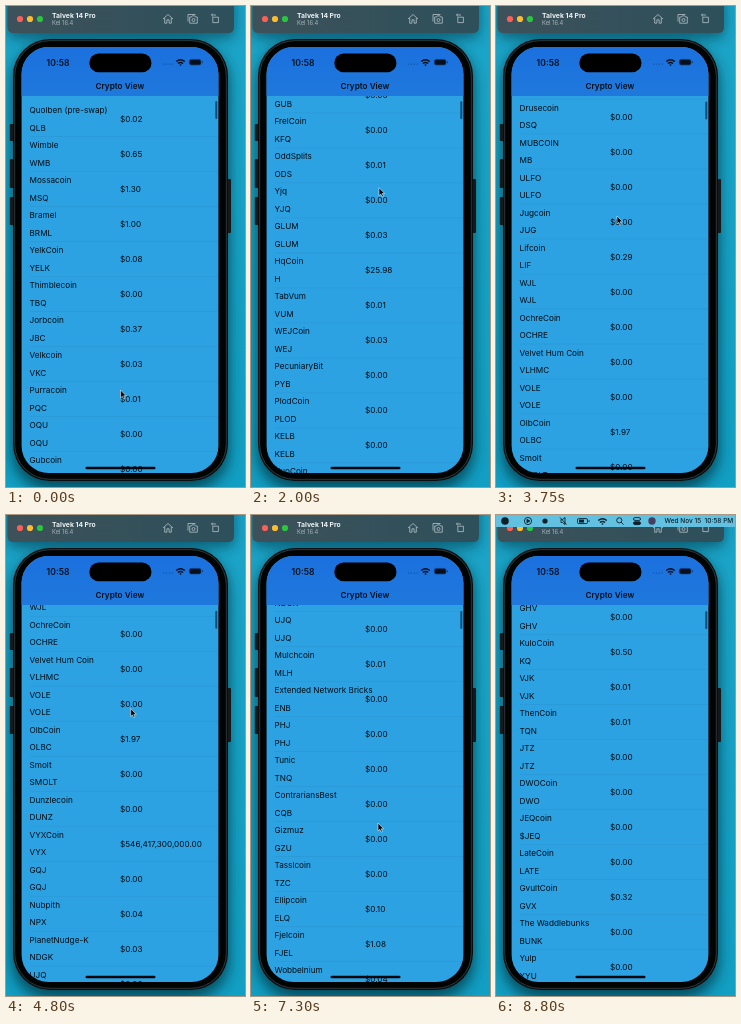
An HTML page for the animation above (8.85 s loop, 239 px wide and 481 px high).

```html
<!DOCTYPE html>
<html lang="en">
<head>
<meta charset="utf-8">
<title>Crypto View</title>
<style>
html, body { margin: 0; width: 100%; height: 100%; overflow: hidden; background: #159fc2; }
svg { display: block; width: 239px; height: 481px; font-family: Inter, Roboto, sans-serif; }
.row { font-size: 8.2px; fill: #020a12; }
.icon { fill: none; stroke: #b4c1c7; stroke-width: .8; }
.menu { fill: none; stroke: #0c2029; stroke-width: .9; }
</style>
</head>
<body>
<svg viewBox="0 0 239 481">
  <defs>
    <linearGradient id="desk" x2="0" y2="1">
      <stop stop-color="#1ba5c8"/><stop offset="1" stop-color="#119fc3"/>
    </linearGradient>
    <linearGradient id="tool">
      <stop stop-color="#3d5159"/><stop offset="1" stop-color="#2d505b"/>
    </linearGradient>
    <linearGradient id="head" x2="0" y2="1">
      <stop stop-color="#1b70de"/><stop offset="1" stop-color="#1f79dc"/>
    </linearGradient>
    <filter id="blur" x="-20%" y="-100%" width="140%" height="300%"><feGaussianBlur stdDeviation="7"/></filter>
    <clipPath id="screen"><rect x="15.6" y="41" width="196.8" height="426" rx="27"/></clipPath>
    <clipPath id="view"><rect x="15" y="90" width="198" height="378"/></clipPath>
    <g id="wifi" fill="none" stroke-width="1.4">
      <path d="M-4.3-1.2Q0-5 4.3-1.2M-2.6.8Q0-1.6 2.6.8"/><path d="M-.8 2.2h1.6"/>
    </g>
  </defs>

  <rect width="239" height="481" fill="url(#desk)"/>
  <g fill="#02303d" filter="url(#blur)">
    <rect x="2" y="-10" width="226" height="42" rx="6" opacity=".6"/>
    <rect x="6" y="38" width="217" height="446" rx="38" opacity=".75"/>
  </g>

  <!-- simulator toolbar -->
  <path d="M1.5 0H228V21Q228 27 222 27H7.5Q1.5 27 1.5 21Z" fill="url(#tool)"/>
  <circle cx="14" cy="13" r="3.1" fill="#fb5f57"/>
  <circle cx="24" cy="13" r="3.1" fill="#fcbc2f"/>
  <circle cx="34" cy="13" r="3.1" fill="#2ac640"/>
  <text x="46" y="12" font-size="6.8" font-weight="700" fill="#eef3f5">Talvek 14 Pro</text>
  <text x="46" y="19" font-size="5.8" fill="#a3b2b9">Kel 16.4</text>
  <g class="icon">
    <path d="M157 13l5-4.5 5 4.5M158.7 12v5.2h2.2v-3.4h2.2v3.4h2.2V12"/>
    <path d="M182 15.5v-7h7.5M183.7 11h1.8l.8-1.2h2.4l.8 1.2h1.8v6.2h-7.6z"/><circle cx="187.5" cy="14" r="1.5"/>
    <path d="M206.8 11.2h5.6v5.4h-5.6zM205.4 9h4.6M206.8 7.6L205.4 9l1.4 1.4"/>
  </g>

  <!-- phone -->
  <g fill="#14191c">
    <rect x="3.8" y="118" width="5" height="17" rx="1"/>
    <rect x="3.8" y="153" width="5" height="29" rx="1"/>
    <rect x="3.8" y="191" width="5" height="28" rx="1"/>
    <rect x="220" y="173" width="5" height="54" rx="1"/>
  </g>
  <rect x="7" y="33" width="215" height="442" rx="37" fill="#0b0e10"/>
  <rect x="8.7" y="34.7" width="211.6" height="438.6" rx="35.3" fill="#020303" stroke="#353a3c" stroke-width=".9"/>
  <g clip-path="url(#screen)">
    <rect x="15" y="41" width="198" height="427" fill="#2da2e3"/>
    <g clip-path="url(#view)"><g id="list"></g></g>
    <rect x="15" y="41" width="198" height="49" fill="url(#head)"/>
    <rect id="thumb" x="209.3" y="95" width="2" height="18" rx="1" fill="#124c78"/>
    <rect x="79.5" y="460.8" width="70" height="2.5" rx="1.25" fill="#02060a"/>
  </g>
  <text x="52" y="59.8" font-size="8.6" font-weight="600" text-anchor="middle" fill="#06101c">10:58</text>
  <rect x="83.3" y="47.6" width="62.2" height="18.6" rx="9.3"/>
  <path d="M157 58.2h10" stroke="#1558ad" stroke-width="1.3" stroke-dasharray="1.3 1.6"/>
  <use href="#wifi" x="174.5" y="56.8" stroke="#06101c"/>
  <rect x="183.4" y="53.4" width="11.6" height="5.6" rx="1.8" fill="#06101c" stroke="#123f80" stroke-width=".7"/>
  <path d="M196.4 55.2v2" stroke="#123f80"/>
  <text x="113.9" y="82.5" font-size="8.2" font-weight="600" text-anchor="middle" fill="#06101c">Crypto View</text>

  <path id="mouse" d="M0 0V8L1.8 6.3 3.1 9.1 4.4 8.5 3.2 5.8H5.7Z" fill="#050505" stroke="#e8f2f8" stroke-width=".6"/>

  <!-- system menu bar -->
  <g id="bar">
    <rect width="239" height="12" fill="#62c1e1"/>
    <circle cx="9" cy="6" r="3.8" fill="#0c2029"/>
    <g class="menu">
      <circle cx="32" cy="6" r="3.6"/><path d="M31 4.3v3.4L33.8 6z" fill="#0c2029"/>
      <path d="M65 4.5h1.5L69 2.5v7L66.5 7.5H65zM64 2.5l6.5 7"/>
      <rect x="81.5" y="3.6" width="10" height="5" rx="1.3"/><path d="M83 6.1h5" stroke-width="3"/><path d="M93 5.2v1.8"/>
      <circle cx="123.3" cy="5.3" r="2.6"/><path d="M125.2 7.2l2.3 2.4"/>
      <rect x="137.5" y="2.6" width="7" height="2.8" rx="1.4"/><rect x="137.5" y="6.8" width="7" height="2.8" rx="1.4" fill="#0c2029"/>
    </g>
    <circle cx="49" cy="6" r="2.6" fill="#0c2029"/>
    <use href="#wifi" x="106.5" y="6.8" stroke="#0c2029"/>
    <circle cx="156" cy="6" r="3.7" fill="#45405f"/>
    <text x="168.5" y="8.3" font-size="6.5" font-weight="500" fill="#0c2029" xml:space="preserve">Wed Nov 15  10:58 PM</text>
  </g>
</svg>
<script>
// name | ticker (defaults to the name) | price (defaults to 0.00)
const coins = `Quolben (pre-swap)|QLB|0.02
Wimble|WMB|0.65
Mossacoin|MSQ|1.30
Bramel|BRML|1.00
YelkCoin|YELK|0.08
Thimblecoin|TBQ
Jorbcoin|JBC|0.37
Velkcoin|VKC|0.03
Purracoin|PQC|0.01
OQU
Gubcoin|GUB
FrelCoin|KFQ
OddSplits|ODS|0.01
Yjq|YJQ
GLUM||0.03
HqCoin|H|25.98
TabVum|VUM|0.01
WEJCoin|WEJ|0.03
PecuniaryBit|PYB
PlodCoin|PLOD
KELB
VuoCoin|VUO|0.01
NubHaul|NUBHL
TovCoin|TOV
Drusecoin|DSQ
MUBCOIN|MB
ULFO
Jugcoin|JUG
Lifcoin|LIF|0.29
WJL
OchreCoin|OCHRE
Velvet Hum Coin|VLHMC
VOLE
OlbCoin|OLBC|1.97
Smolt|SMOLT
Dunzlecoin|DUNZ
VYXCoin|VYX|546,417,300,000.00
GQJ
Nubpith|NPX|0.04
PlanetNudge-K|NDGK|0.03
UJQ
Mulchcoin|MLH|0.01
Extended Network Bricks|ENB
PHJ
Tunic|TNQ
ContrariansBest|CQB
Gizmuz|GZU
Tasslcoin|TZC
Ellipcoin|ELQ|0.10
Fjelcoin|FJEL|1.08
Wobbelnium|WBN|0.04
Hurmcoin|HRQ
Plinkel|PLQ|0.02
GHV
KuloCoin|KQ|0.50
VJK||0.01
ThenCoin|TQN|0.01
JTZ
DWOCoin|DWO
JEQcoin|$JEQ
LateCoin|LATE
GvultCoin|GVX|0.32
The Waddlebunks|BUNK
Yulp|XYU`.split('\n');

const LOOP = 8850, STEP = 50, PITCH = 35;
const get = id => document.getElementById(id);
const list = get('list'), mouse = get('mouse'), thumb = get('thumb'), bar = get('bar');

list.innerHTML = coins.map((line, i) => {
  const [name, ticker, price] = line.split('|');
  return `<g class="row" transform="translate(0 ${i * PITCH})">
    <text x="23.5" y="107">${name}</text>
    <text x="23.5" y="124.6">${ticker || name}</text>
    <text x="114" y="116">$${price || '0.00'}</text>
    <path d="M24 130.5H212" stroke="#2790cc" stroke-width=".5"/></g>`;
}).join('');

// time, scroll offset, pointer x, pointer y
const keys = [
  [0, 0, 114.5, 384],
  [1350, 205, 125.7, 268.5],
  [2650, 560, 128, 119.5],
  [3750, 842.5, 121, 210],
  [5850, 1220, 129, 181.5],
  [7300, 1399, 127, 308],
  [8000, 1660, 250, -12],
  [8800, 1866, 250, -12]
];

// Smooth curve through the keys
function sample(t, col) {
  const last = keys.length - 1;
  const slope = i => {
    const a = keys[Math.max(i - 1, 0)], b = keys[Math.min(i + 1, last)];
    return (b[col] - a[col]) / (b[0] - a[0]);
  };
  let i = 0;
  while (i < last - 1 && t >= keys[i + 1][0]) i++;
  const a = keys[i], b = keys[i + 1], d = b[0] - a[0], u = (t - a[0]) / d, v = 1 - u;
  return v * v * ((1 + 2 * u) * a[col] + u * d * slope(i))
       + u * u * ((3 - 2 * u) * b[col] - v * d * slope(i + 1));
}

const move = (el, x, y) => el.setAttribute('transform', `translate(${x} ${y})`);

function draw(now) {
  const t = Math.floor(now % LOOP / STEP) * STEP;
  const scroll = sample(t, 1);
  move(list, 0, -scroll);
  move(thumb, 0, scroll / 1400);
  move(mouse, sample(t, 2), sample(t, 3));
  const shown = Math.min(1, Math.max(0, (t - 7900) / 200));
  move(bar, 0, -13 * (1 - shown) ** 2);
}

const start = performance.now();
function tick() {
  draw(performance.now() - start);
  requestAnimationFrame(tick);
}
tick();
</script>
</body>
</html>
```
